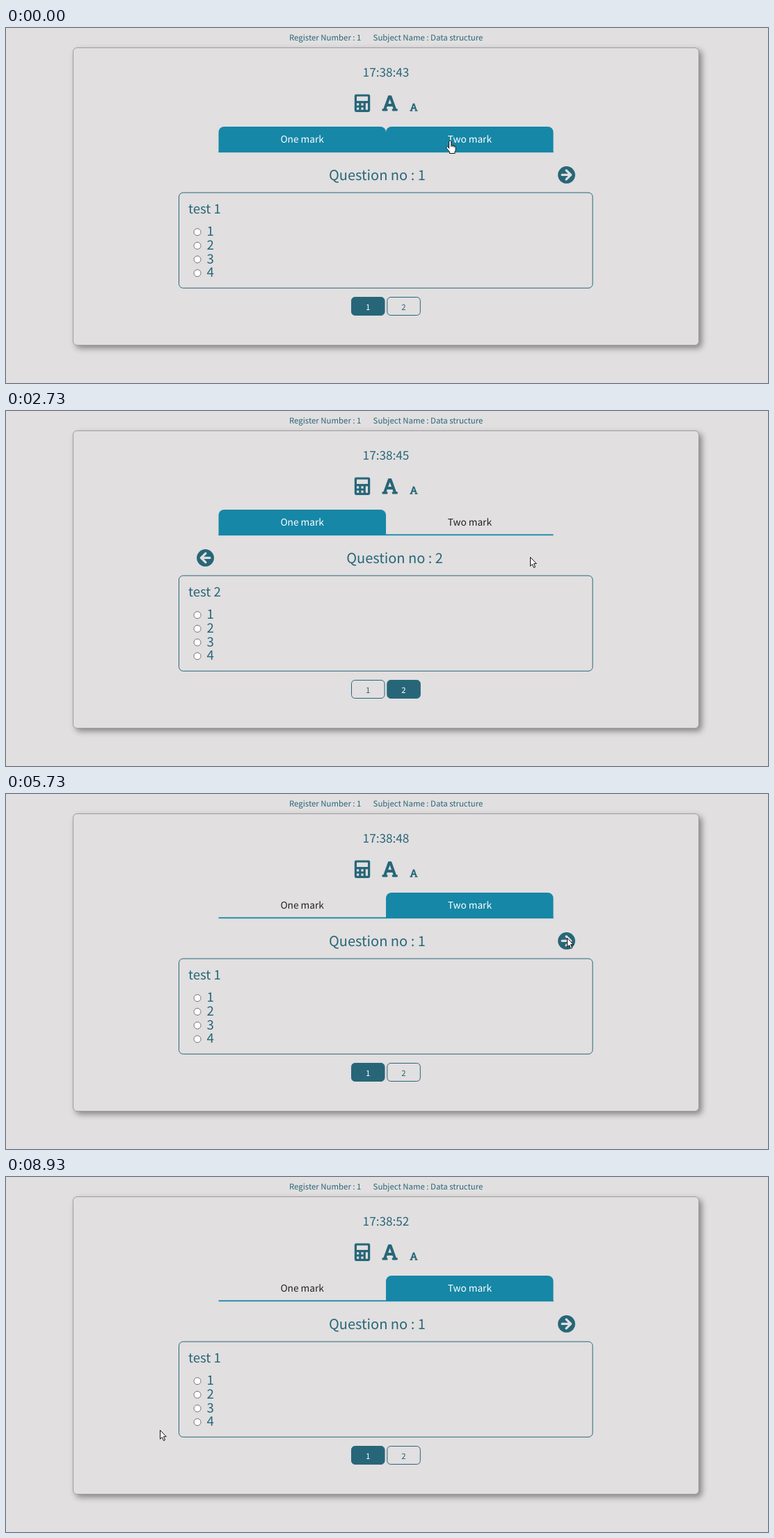
Recreate the animation shown at these times as an HTML page. Size 1095 px wide and 511 px high, loop 9.74 s.

```html
<!DOCTYPE html>
<html lang="en">
<head>
<meta charset="utf-8">
<title>Online test</title>
<style>
  html, body { margin: 0; width: 100%; height: 100%; overflow: hidden; background: #e1dfe0; }
  svg { display: block; width: 100%; height: 100%; }
  text { font-family: "Noto Sans CJK JP", "Noto Sans CJK SC", "Noto Sans CJK", "Noto Sans", sans-serif;
         fill: #276678; white-space: pre; text-rendering: geometricPrecision; }
  .mid { text-anchor: middle; }
  .small { font-size: 11.4px; }
  .clock { font-size: 17.2px; }
  .title { font-size: 20px; }
  .body { font-size: 18.6px; }
  .tab { font-size: 13.7px; font-weight: 500; }
  .icon { fill: #276678; fill-rule: evenodd; }
  .box { fill: none; stroke: #276678; }
  #card { fill: #e1dfe0; stroke: #a09fa0; filter: drop-shadow(4px 4px 4px #0006); }
  .radio { fill: #fff; stroke: #767676; }
  .cursor { fill: #fff; stroke: #111; stroke-linejoin: round; }
</style>
</head>
<body>
<svg viewBox="0 0 1095 511">
  <defs>
    <path id="letter" d="M432 416h-23.4L277.5 53.7A32 32 0 0 0 247.6 32h-47.2a32 32 0 0 0-30 21.7L39.4 416H16a16 16 0 0 0-16 16v32a16 16 0 0 0 16 16h128a16 16 0 0 0 16-16v-32a16 16 0 0 0-16-16h-19.6l23.3-64h152.6l23.3 64H304a16 16 0 0 0-16 16v32a16 16 0 0 0 16 16h128a16 16 0 0 0 16-16v-32a16 16 0 0 0-16-16zM176.9 272L224 142.5 271.1 272z"/>
    <g id="arrow">
      <circle r="12.4"/>
      <path d="M-6.4 0H6M-.4-6.5L6.2 0L-.4 6.5" fill="none" stroke="#e1dfe0" stroke-width="3.2" stroke-linecap="round" stroke-linejoin="round"/>
    </g>
    <path id="tabShape" d="M0 37V8a8 8 0 0 1 8-8H232.5a8 8 0 0 1 8 8V37z" fill="#1687a7"/>
  </defs>

  <text class="small" x="407" y="18.4">Register Number : 1</text>
  <text class="small" x="527.6" y="18.4">Subject Name : Data structure</text>
  <rect id="card" x="96.5" y="28.5" width="899" height="428" rx="5.5"/>
  <text id="clock" class="clock mid" x="546" y="70"></text>

  <g class="icon">
    <path transform="translate(500.8 95.4) scale(.05)" d="M48 0H400a48 48 0 0 1 48 48V464a48 48 0 0 1-48 48H48a48 48 0 0 1-48-48V48a48 48 0 0 1 48-48zM64 64V192H384V64zM64 256v64h64v-64zM192 256v64h64v-64zM64 384v64h64v-64zM192 384v64h64v-64zM320 256V448h64V256z"/>
    <use href="#letter" transform="translate(540.4 95.4) scale(.05)"/>
    <use href="#letter" transform="translate(580.3 107.8) scale(.025)"/>
  </g>

  <use id="tabOne" href="#tabShape" x="305.5" y="142"/>
  <use id="tabTwo" href="#tabShape" x="546" y="142"/>
  <rect x="305.5" y="177.4" width="481" height="1.8" fill="#1687a7"/>
  <rect id="edge" y="176.6" width="240.5" height="1" fill="#e8eef0"/>
  <text id="labelOne" class="tab mid" x="425.6" y="165">One mark</text>
  <text id="labelTwo" class="tab mid" x="666.4" y="165">Two mark</text>

  <text id="heading" class="title mid" y="219"></text>
  <use id="next" class="icon" href="#arrow" transform="translate(805.5 211.4)"/>
  <use id="back" class="icon" href="#arrow" transform="translate(286.5 211.4) scale(-1 1)"/>

  <rect class="box" x="248.5" y="237" width="594.5" height="137.3" rx="6"/>
  <text id="question" class="body" x="262" y="266.8"></text>
  <g id="options"></g>

  <g id="endTest">
    <rect x="510.5" y="388.3" width="71" height="39.4" rx="5" fill="none" stroke="#fb2727" stroke-width="1.8"/>
    <text class="small mid" x="545.9" y="412.6" style="fill:#fb3434">End Test</text>
  </g>
  <g id="pages">
    <rect id="page1" class="box" x="496.5" y="387.5" width="47.5" height="26" rx="5"/>
    <rect id="page2" class="box" x="547.8" y="387.5" width="47.5" height="26" rx="5"/>
    <text id="num1" class="small mid" x="520.2" y="405.6">1</text>
    <text id="num2" class="small mid" x="571.5" y="405.6">2</text>
  </g>

  <g id="pointer" class="cursor">
    <path id="plain" d="M.5.5V13.2L3.3 10.5L5.5 15.5L7.6 14.5L5.5 9.7H9.3z"/>
    <g id="hand" transform="translate(-6 -.4)">
      <path d="M4.6 2.2a1.6 1.6 0 0 1 3.2 0V7l4.6 1q1.8.5 1.8 2.4v3q0 1.8-1.2 3.2v2.3H5.4v-2.3L1 11.6q-.9-1.7.5-2.2t2.1.8l1 1.4z"/>
      <path d="M7.8 7v2.5M10 7.7v2M12.2 8.2v2" fill="none"/>
    </g>
  </g>
</svg>
<script>
const LOOP = 9740, STEP = 200 / 3, FADE = 400;
const $ = id => document.getElementById(id);

// time, x, y of the pointer tip
const path = [
  [0, 638, 162], [130, 638, 162], [400, 557, 172], [600, 505, 174], [930, 484, 163],
  [1340, 484, 163], [1530, 495, 195], [1730, 565, 243], [1930, 680, 250], [2130, 796, 215], [2200, 804, 210],
  [2600, 804, 210], [3000, 650, 209], [3400, 370, 212], [3600, 279, 212],
  [3730, 279, 212], [4070, 438, 203], [4400, 545, 190],
  [4670, 545, 190], [5000, 619, 163], [5070, 622, 164], [5270, 675, 215], [5400, 725, 231], [5670, 806, 207],
  [6200, 806, 207], [6600, 500, 213], [6800, 271, 214], [6930, 277, 209],
  [7200, 277, 209], [7470, 150, 290], [7730, 18, 410], [7930, 70, 484], [8200, 175, 436],
  [8270, 177, 434], [8670, 221, 364]
];
// start of a fade, fill level it goes to
const fillOne = [[0, 1], [150, 0], [425, 1], [4955, 0]];
const fillTwo = [[0, 1], [1355, 0], [4710, 1]];
// time of a click on a tab, left edge of that tab
const clicks = [[150, 546], [1355, 305.5], [4955, 546]];
// start, question, last page of the test
const views = [[0, 1], [2460, 2], [3660, 1], [5925, 2, true], [7060, 1]];

const latest = (table, t) => table.findLast(row => row[0] <= t);

function pointerAt(t) {
  const i = path.findIndex(p => p[0] > t);
  if (i < 0) return path.at(-1).slice(1);
  const [a, b] = [path[i - 1], path[i]], k = (t - a[0]) / (b[0] - a[0]);
  return [1, 2].map(n => Math.round(a[n] + (b[n] - a[n]) * k));
}

// CSS "ease" curve, solved by bisection
function ease(x) {
  const curve = (p, q, u) => 3 * p * u * (1 - u) ** 2 + 3 * q * u * u * (1 - u) + u ** 3;
  let low = 0, high = 1;
  for (let i = 0; i < 20; i++) {
    const u = (low + high) / 2;
    if (curve(.25, .25, u) < x) low = u; else high = u;
  }
  return curve(.1, 1, low);
}

function level(table, t) {
  let value = table[0][1];
  table.forEach(([start, to], i) => {
    if (!i || t < start) return;
    const end = Math.min(t, table[i + 1]?.[0] ?? LOOP);
    value += (to - value) * ease(Math.min(1, (end - start) / FADE));
  });
  return value;
}

const show = (id, on) => $(id).style.display = on ? "" : "none";

function paintTab(name, amount) {
  $("tab" + name).style.opacity = amount;
  const grey = 34 + 221 * amount;
  $("label" + name).style.fill = `rgb(${grey},${grey},${grey})`;
}

function render(now) {
  const t = Math.floor((now % LOOP + 4) / STEP) * STEP;
  $("clock").textContent = "17:38:" + (43 + Math.floor((t + 67) / 1000));

  paintTab("One", level(fillOne, t));
  paintTab("Two", level(fillTwo, t));
  const click = latest(clicks, t);
  $("edge").style.opacity = click ? Math.max(0, 1 - (t - click[0]) / 200) : 0;
  $("edge").setAttribute("x", click ? click[1] : 0);

  const [, n, last] = latest(views, t);
  $("heading").textContent = "Question no : " + n;
  $("heading").setAttribute("x", n === 1 ? 533.4 : 558.6);
  $("question").textContent = "test " + n;
  show("next", n === 1);
  show("back", n === 2);
  show("endTest", last);
  $("card").setAttribute("height", last ? 481.5 : 428);
  $("pages").setAttribute("transform", `translate(0 ${last ? 53.7 : 0})`);
  for (const p of [1, 2]) {
    $("page" + p).style.fill = p === n ? "#276678" : "none";
    $("num" + p).style.fill = p === n ? "#fff" : "";
  }

  const [x, y] = pointerAt(t);
  const onTab = y > 142 && y < 179 && x > 305 && x < 787;
  $("pointer").setAttribute("transform", `translate(${x} ${y})`);
  show("hand", onTab);
  show("plain", !onTab);
}

$("options").innerHTML = [1, 2, 3, 4].map((n, i) => {
  const y = i * 19.7;
  return `<circle class="radio" cx="275" cy="${293.7 + y}" r="5"/>
    <text class="body" x="288.4" y="${299.3 + y}">${n}</text>`;
}).join("");

const start = performance.now();
function tick() {
  render(performance.now() - start);
  requestAnimationFrame(tick);
}
tick();
</script>
</body>
</html>
```
